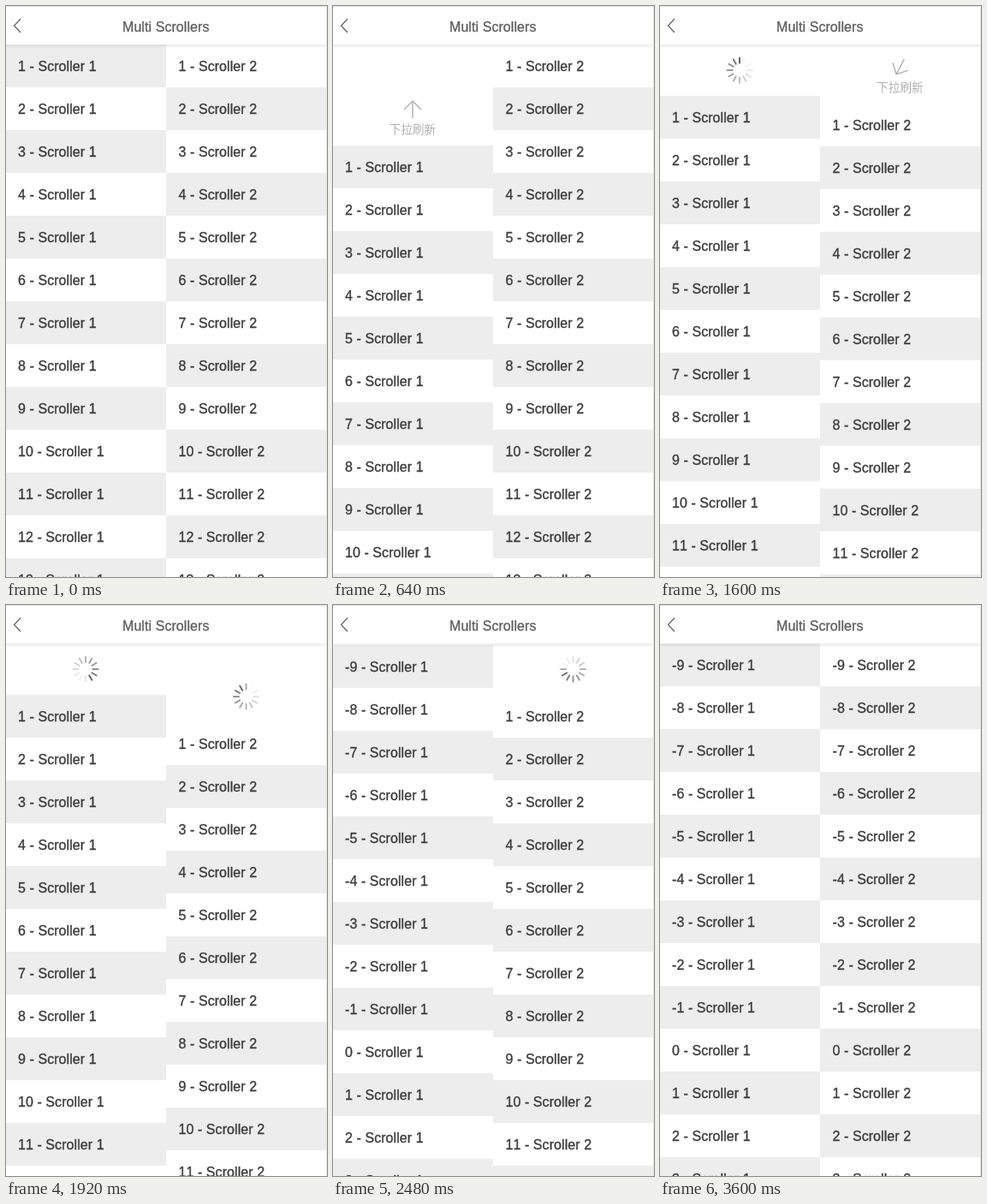
Write an HTML page with a canvas that moves like this. It is 375 px wide and 667 px high and loops after 4000 ms.

```html
<!DOCTYPE html>
<html lang="en">
<head>
<meta charset="utf-8">
<title>Multi Scrollers</title>
<style>
  html, body { margin: 0; width: 100%; height: 100%; overflow: hidden; background: #fff; }
  canvas { display: block; width: 375px; height: 667px; }
</style>
</head>
<body>
<canvas id="stage" width="375" height="667"></canvas>
<script>
const ctx = document.getElementById('stage').getContext('2d');
const W = 375, H = 667, TOP = 45, ROW = 50, HALF = 187;
const LOOP = 4000, TICK = 80;
const PULL = 118, REST = 60, TURN = 750, FLIP = 200;
const SANS = '16px "Liberation Sans", Arial, sans-serif';
const CJK = '13.6px "Noto Sans CJK SC", "Noto Sans CJK", sans-serif';
const FADE = [1, .85, .7, .65, .55, .45, .35, .25, .15, .1, 0, 1];

const columns = [
  { id: 1, x: 0, mid: 93, gray: 0, pull: [240, 640], release: 873, done: 2280, close: 250, flip: 430, spin: 852.5 },
  { id: 2, x: HALF, mid: 280.5, gray: 1, pull: [1400, 1760], release: 1799.5, done: 3250, close: 300, flip: 1570, spin: 1951 }
];

const clamp = v => Math.max(0, Math.min(1, v));
const smooth = p => p * p * (3 - 2 * p);
const cubic = p => p < .5 ? 4 * p ** 3 : 1 - 4 * (1 - p) ** 3;
const mix = (a, b, p) => a + (b - a) * p;

function offsetAt(c, t) {
  if (t < c.release) {
    return PULL * smooth(clamp((t - c.pull[0]) / (c.pull[1] - c.pull[0])));
  }
  if (t < c.done) return mix(PULL, REST, cubic(clamp((t - c.release) / 250)));
  return mix(REST, 0, cubic(clamp((t - c.done) / c.close)));
}

function line(points, color, width) {
  ctx.strokeStyle = color;
  ctx.lineWidth = width;
  ctx.beginPath();
  points.forEach(([x, y]) => ctx.lineTo(x, y));
  ctx.stroke();
}

// A hairline outline gives the labels their slightly heavier weight.
function label(str, x, y, color) {
  ctx.font = SANS;
  ctx.fontKerning = 'none';
  ctx.letterSpacing = '0.07px';
  ctx.textAlign = 'left';
  ctx.fillStyle = ctx.strokeStyle = color;
  ctx.lineWidth = .35;
  ctx.fillText(str, x, y);
  ctx.strokeText(str, x, y);
}

function spinner(x, y, t, start) {
  ctx.save();
  ctx.translate(x, y);
  ctx.lineCap = 'round';
  const head = (t - start) / TURN;
  for (let i = 0; i < 12; i++) {
    const age = (((head - i / 12) % 1) + 1) % 1 * 11;
    const k = Math.floor(age);
    ctx.globalAlpha = mix(FADE[k], FADE[k + 1], age - k);
    line([[0, -8.5], [0, -14.5]], '#606060', 2);
    ctx.rotate(Math.PI / 6);
  }
  ctx.restore();
}

function hint(x, row, turn) {
  ctx.save();
  ctx.translate(x, row - 42.5);
  ctx.rotate(Math.PI * turn);
  line([[0, -10.5], [0, 9.5]], '#b4b4b4', 1.5);
  line([[-10, -.5], [0, 9.5], [10, -.5]], '#b4b4b4', 1.5);
  ctx.restore();
  ctx.font = CJK;
  ctx.letterSpacing = '0px';
  ctx.textAlign = 'center';
  ctx.fillStyle = '#b0b0b0';
  ctx.fillText('下拉刷新', x, row - 14);
}

function drawColumn(c, t) {
  const row = TOP + offsetAt(c, t);
  if (t >= c.release && t < c.done) {
    spinner(c.mid, row - 30, t, c.spin);
  } else {
    hint(c.mid, row, t < c.release ? clamp((t - c.flip) / FLIP) : 0);
  }
  const first = t < c.done ? 1 : -9;
  for (let i = 0, y = row; y < H; i++, y += ROW) {
    ctx.fillStyle = i % 2 === c.gray ? '#ededed' : '#fff';
    ctx.fillRect(c.x, y, HALF, ROW);
    label(`${first + i} - Scroller ${c.id}`, c.mid - 79, y + 31, '#3c3c3c');
  }
}

function drawHeader() {
  ctx.fillStyle = '#fff';
  ctx.fillRect(0, 0, W, TOP);
  ctx.fillStyle = '#e2e2e2';
  ctx.fillRect(0, 0, W, 1);
  [.07, .05, .04, .025].forEach((a, i) => {
    ctx.fillStyle = `rgba(0,0,0,${a})`;
    ctx.fillRect(i / 2, TOP + i, 374 - i, 1);
  });
  line([[17, 15], [9.5, 23], [17, 31]], '#666', 1.3);
  label('Multi Scrollers', 136, 30, '#606060');
}

function draw(t) {
  ctx.fillStyle = '#fff';
  ctx.fillRect(0, 0, W, H);
  columns.forEach(c => drawColumn(c, t));
  drawHeader();
  ctx.fillStyle = '#e4e4e4';
  ctx.fillRect(374, 0, 1, H);
}

const begin = performance.now();
function frame() {
  const t = Math.max(0, performance.now() - begin) % LOOP;
  draw(Math.floor(t / TICK) * TICK);
  requestAnimationFrame(frame);
}
frame();
</script>
</body>
</html>
```
